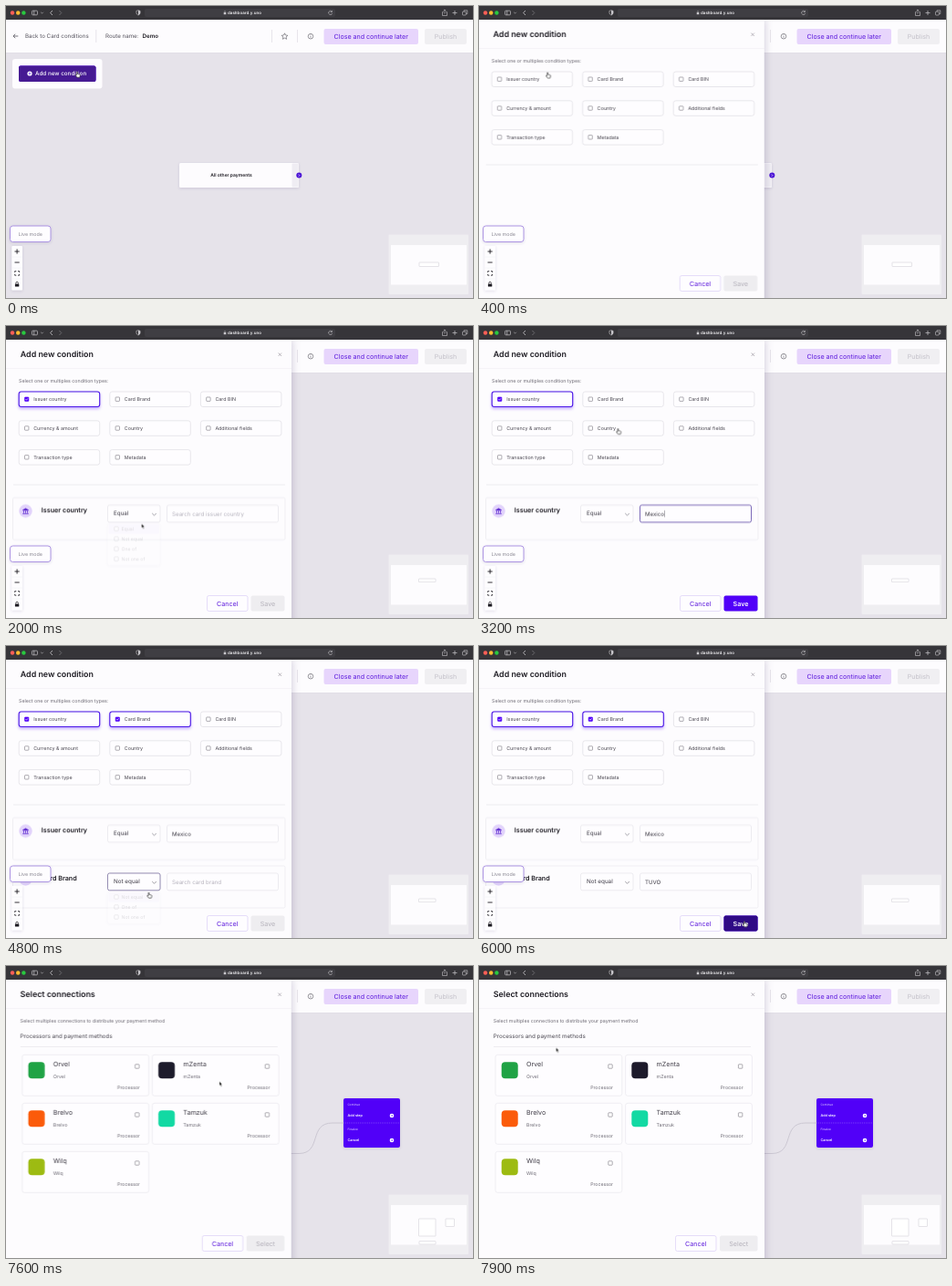
Write an HTML page that moves like this. It is 512x320 px and loops after 8000 ms.

```html
<!DOCTYPE html>
<html lang="en">
<head>
<meta charset="utf-8">
<title>Card conditions</title>
<style>
html, body { margin: 0; width: 100%; height: 100%; overflow: hidden; background: #e6e3ea; }
svg { display: block; width: 512px; height: 320px; overflow: hidden; }
text { font-family: Inter, sans-serif; text-rendering: geometricPrecision; white-space: pre; }
</style>
</head>
<body>
<svg id="stage" viewBox="0 0 512 320"></svg>
<script>
const LOOP = 8000, VIOLET = '#5100f8', INK = '#1d1b22', GREY = '#6c6973';
const css = [];
const pct = ms => (ms / LOOP * 100).toFixed(4) + '%';

function animate(stops, body) {
  const name = 'k' + css.length;
  css.push(`@keyframes ${name}{${stops.map(([t, rule]) => pct(t) + '{' + rule + '}').join('')}}`);
  return `<g style="animation:${name} ${LOOP}ms linear infinite">${body}</g>`;
}

// Shows the body during the given [from, to] spans
function vis(spans, body, fadeIn = 1, fadeOut = 1) {
  const stops = [];
  if (spans[0][0] > 0) stops.push([0, 0]);
  for (const [a, b] of spans) {
    if (a > 0) stops.push([a - fadeIn, 0]);
    stops.push([a, 1]);
    if (b < LOOP) stops.push([b - 1, 1], [b - 1 + fadeOut, 0]);
    else stops.push([LOOP, 1]);
  }
  if (spans[spans.length - 1][1] < LOOP) stops.push([LOOP, 0]);
  return animate(stops.map(([t, o]) => [t, 'opacity:' + o]), body);
}
const span = (a, b, body, fadeIn, fadeOut) => vis([[a, b]], body, fadeIn, fadeOut);

function move(points, body) {
  return animate(points.map(([t, x, y, ease = 'ease-in-out']) =>
    [t, `transform:translate(${x}px,${y}px);animation-timing-function:${ease}`]), body);
}

const text = (x, y, size, str, fill = GREY, weight = 400, anchor = 'start') =>
  `<text x="${x}" y="${y}" font-size="${size}" fill="${fill}" font-weight="${weight}" text-anchor="${anchor}">${str}</text>`;
const box = (x, y, w, h, fill, stroke = 'none', r = 2, sw = .7, extra = '') =>
  `<rect x="${x}" y="${y}" width="${w}" height="${h}" rx="${r}" fill="${fill}" stroke="${stroke}" stroke-width="${sw}" ${extra}/>`;
const dot = (x, y, r, fill, stroke = 'none', sw = .7) =>
  `<circle cx="${x}" cy="${y}" r="${r}" fill="${fill}" stroke="${stroke}" stroke-width="${sw}"/>`;
const line = (d, stroke, sw = .7, extra = '') =>
  `<path d="${d}" fill="none" stroke="${stroke}" stroke-width="${sw}" ${extra}/>`;
const at = (x, y, body, k = 1) => `<g transform="translate(${x} ${y}) scale(${k})">${body}</g>`;

const defs = `<defs>
  <filter id="soft" x="-20%" y="-30%" width="140%" height="170%"><feDropShadow dx="0" dy="1" stdDeviation="1.8" flood-color="#4b3a78" flood-opacity=".16"/></filter>
  <filter id="glow" x="-20%" y="-40%" width="140%" height="200%"><feDropShadow dx="0" dy="2" stdDeviation="1.6" flood-color="#6a30ff" flood-opacity=".38"/></filter>
</defs>`;

function browserBar() {
  const pale = '#c9c8cc', dim = '#77767a';
  return box(0, 0, 512, 15, '#363539', 'none', 0) +
    ['#fe5f57', '#febc2e', '#28c840'].map((c, i) => dot(7 + i * 6.2, 7.5, 2.2, c)).join('') +
    box(28.5, 5.2, 6, 4.6, 'none', pale, 1, .7) + line('M30.7 5.2v4.6', pale) +
    line('M38.2 6.8l1.3 1.3 1.3-1.3', pale, .6) +
    line('M51 5l-2.4 2.5L51 10', pale, .8) + line('M58.4 5l2.4 2.5L58.4 10', dim, .8) +
    line('M145 4.7l2.1.7v2q0 1.8-2.1 2.7-2.1-.9-2.1-2.7v-2z', pale, .6) +
    `<path d="M145 4.7v5.4q2.1-.9 2.1-2.7v-2z" fill="${pale}"/>` +
    box(152, 3, 209, 9, '#3f3e43', 'none', 2) +
    box(238.7, 7, 2.6, 2.2, pale, 'none', .3) + line('M239.3 7V6.2a.7.7 0 0 1 1.4 0V7', pale, .4) +
    text(243, 9.2, 4.5, 'dashboard.y.uno', '#f1f0f3', 600) +
    line('M357.2 6.2a2 2 0 1 0 .4 1.7M357.4 4.9v1.6h-1.6', pale, .6) +
    line('M479.6 6.6h-1.1v3.9h5V6.6h-1.1M481 8.6V4M479.7 5.2L481 3.9l1.3 1.3', pale, .6) +
    line('M492 5v5M489.5 7.5h5', pale, .7) +
    box(500.5, 6.2, 3.8, 3.8, 'none', pale, .6, .6) + line('M502 6.2V4.8h3.8v3.8h-1.5', pale, .6);
}

function header() {
  const dark = '#55525c';
  return box(0, 15, 512, 36.5, '#fdfcfe', 'none', 0) + line('M0 51.5H512', '#d9d6de', .6) +
    line('M13.3 33H8M10.2 30.8L8 33l2.2 2.2', dark, .8) +
    text(21, 35.3, 6.2, 'Back to Card conditions', dark) +
    line('M98.8 26v14M291.5 26v14M319.5 26v14', '#dedbe3') +
    text(109, 35.3, 6.2, 'Route name:', dark) + text(149.5, 35.3, 6.2, 'Demo', INK, 600) +
    line('M305.5 29.8l1 2.2 2.4.3-1.8 1.6.5 2.4-2.1-1.2-2.1 1.2.5-2.4-1.8-1.6 2.4-.3z', dark, .6) +
    dot(334, 33.2, 2.8, 'none', dark, .6) + line('M334 32.8v1.8M334 31.5v.6', dark, .6) +
    box(348.5, 25, 103.5, 17, '#e7d5fc') +
    text(400.2, 35.9, 7.1, 'Close and continue later', '#5a17dc', 400, 'middle') +
    box(459, 25, 46, 17, '#f0eff2') + text(482, 35.9, 7.1, 'Publish', '#c3c0c9', 400, 'middle');
}

const handle = (x, y) => dot(x, y, 3, '#4b12d6') + line(`M${x - .6} ${y - 1.2}l1.2 1.2-1.2 1.2`, '#fff', .7);

function restNode(x, y) {
  return box(x, y, 131, 27, '#fdfcfe', 'none', 1.5, 0, 'filter="url(#soft)"') +
    box(x + 123.5, y + .5, 7.2, 26, '#efedf3', 'none', 1) +
    text(x + 57, y + 15.3, 5, 'All other payments', INK, 600, 'middle') + handle(x + 131.3, y + 13.6);
}

const bank = `<path d="M0-3.2L3.3-1.2v.7h-6.6v-.7zM-2.6 0h1v2h-1zM-.5 0h1v2h-1zM1.6 0h1v2h-1zM-3.3 2.4h6.6v.9h-6.6z" fill="#5a25cf"/>`;
const card = box(-3, -2.2, 6, 4.4, 'none', '#5a25cf', .6, .7) + line('M-3-.7h6', '#5a25cf', .8);
const badge = (x, y, r, icon) => dot(x, y, r, '#e2d3fb') + at(x, y, icon, r / 7.2);

function conditionNode() {
  const part = (y, icon, name, op, w, value, vw) => badge(201, y, 4.2, icon) +
    text(197, y + 13, 3.9, name, INK, 600) +
    box(197, y + 19.3, w, 9, '#d5e8fb', '#86b4ec', 2, .7) + text(199.2, y + 25.3, 4.3, op, '#34506e') +
    box(197, y + 33, vw, 7, '#fff', '#eceaf0', 1, .5) + text(199, y + 37.6, 2.9, value, GREY);
  return box(188, 145, 114, 121, '#fdfcfe', 'none', 1.5, 0, 'filter="url(#soft)"') +
    box(295, 145.5, 6.8, 120, '#efedf3', 'none', 1) +
    line('M282 145V266M188 215.5H282', '#efedf2', .5) +
    part(158, bank, 'Issuer country', 'Equal', 15.5, 'MX', 10) +
    part(216.3, card, 'Card Brand', 'Not equal', 24.5, 'tuvo', 12) +
    line('M287 161v4.6M286 164.6l1 1 1-1M289.4 165.6V161M288.4 162l1-1 1 1', '#55525c', .6) +
    dot(288.2, 153, .5, '#c9c6cf') + handle(302, 205.3);
}

function stepMenu() {
  const row = (y, head, label) => text(374.5, y - 11, 3.2, head, '#e4d8ff') +
    text(374.5, y + 1.4, 3.8, label, '#fff', 600) + dot(423, y, 2.3, '#fff') +
    line(`M422 ${y}h2M423.2 ${y - .8}l.8.8-.8.8`, VIOLET, .5);
  return line('M305 205.5H321C347 205.5 331 172 358 172H370', '#c5c1cc', .8) +
    box(370, 145, 62, 54, VIOLET, 'none', 2, 0, 'filter="url(#soft)"') +
    row(164, 'Continue', 'Add step') + line('M370 172H432', '#a583fb', .5, 'stroke-dasharray="1 1"') +
    row(191, 'Finalize', 'Cancel');
}

function workspace() {
  const label = text(32, 76.3, 6.3, 'Add new condition', '#fff', 500) +
    dot(26, 74, 2.6, '#fff') + line('M26 72.7v2.6M24.7 74h2.6', VIOLET, .6);
  const mini = (x, y, w, h) => box(x, y, w, h, '#fff', '#d3d1d8', .5, .6);
  return box(0, 0, 512, 320, '#e6e3ea', 'none', 0) + header() +
    box(7, 58, 98.5, 32.5, '#fdfcfe', 'none', 3) + box(14, 65.5, 84.5, 17.5, VIOLET) +
    span(0, 400, box(14, 65.5, 84.5, 17.5, '#461a93')) + label +
    span(0, 1500, restNode(190, 172)) +
    span(6400, LOOP, conditionNode() + at(188, 298, restNode(0, 0), .87), 150) +
    span(6650, LOOP, stepMenu(), 100) +
    box(419.5, 250.5, 87.5, 65.5, '#efeef1', 'none', 1) + box(422, 262, 83, 43.5, '#fdfcfe', 'none', 0) +
    span(0, 1500, mini(453, 281, 21.5, 4.5)) + span(1500, 6400, mini(452.5, 277, 18.5, 3.6)) +
    span(6400, LOOP, mini(452.5, 277, 18.5, 19) + mini(453, 301.5, 18, 3.5)) +
    span(6650, LOOP, mini(482, 277, 9.5, 8.5));
}

const tick = (x, y, on) => box(x - 2.2, y - 2.2, 4.4, 4.4, on ? VIOLET : '#fff', on ? VIOLET : '#77747e', .6, .6) +
  (on ? line(`M${x - 1.2} ${y}l.9 1 1.6-1.8`, '#fff', .7) : '');

function option(x, y, name, since) {
  return box(x, y, 88.5, 16.5, '#fefdff', '#dfdde3', 2.5) + tick(x + 8.5, y + 8.2) +
    (since ? span(since, LOOP, box(x, y, 88.5, 16.5, '#fefdff', '#4b16e8', 2.5, 1.1, 'filter="url(#glow)"') +
      tick(x + 8.5, y + 8.2, true)) : '') +
    text(x + 16, y + 10.2, 5.35, name, '#4a4750');
}

// One condition row; "c" carries its labels and the moments it changes
function condition(c) {
  const frame = (x, w, stroke, sw) => box(x, 8, w, 18.8, '#fefdff', stroke, 2, sw);
  const list = (x, w, rows) => box(x, 28, w, rows.length * 11 + 2, '#fff', '#efedf3', 2, .6, 'filter="url(#soft)"') +
    box(x + 1, 29, w - 2, 10.5, '#f1ebfd', 'none', 1) +
    rows.map((r, i) => tick(x + 9.5, 34 + i * 11) + text(x + 15, 36 + i * 11, 5.2, r)).join('');
  const typed = c.typed.map(([a, b, s]) => span(a, b, text(182, 19.6, 6.1, s, '#3d3a44'))).join('');
  return box(7.5, 0, 298.5, 46, '#fdfcfe', '#eae8ee', 1.5, .7) +
    badge(21.5, 14.5, 7.2, c.icon) + text(38.8, 15.6, 7.2, c.name, INK, 600) +
    frame(111.5, 57.5, '#e6e4ea', .7) + span(...c.select, frame(111.5, 57.5, c.ring, .9)) +
    span(c.start, c.pick, text(118, 18.9, 6.3, 'Conditional', '#b5b2bc')) +
    span(c.pick, LOOP, text(118, 18.9, 6.3, c.op, '#3d3a44')) +
    line('M160.2 17l2.3 2.3 2.3-2.3', '#77747e', .7) +
    frame(176.5, 122, '#e6e4ea', .7) + span(...c.focus, frame(176.5, 122, '#6f5bb0', .9)) +
    span(c.start, c.typed[0][0], text(182, 19.6, 6.2, c.hint, '#b5b2bc')) + typed + c.caret +
    span(c.open, c.pick, list(111.5, 57.5, c.ops), 100, 130) +
    span(c.typed[0][0], c.done, list(176.5, 122, [c.answer]), 60, 100);
}

const drawer = (title, body) =>
  `<g style="filter:drop-shadow(1px 0 4px rgba(60,40,100,.22))">${box(-40, 15, 353, 320, '#fdfcfe', 'none', 0)}</g>` +
  text(15.8, 34.3, 8.9, title, INK, 600) + line('M298.6 29.6l3.4 3.4M302 29.6l-3.4 3.4', '#9c99a3', .7) +
  line('M0 46.5H313', '#f0eef3', .6) + body;
const button = (x, w, label, fill, color, stroke = 'none', weight = 400) =>
  box(x, 295.5, w, 17, fill, stroke) + text(x + w / 2, 306.5, 7.1, label, color, weight, 'middle');

function conditionDrawer() {
  const names = [['Issuer country', 620], ['Card Brand', 3500], ['Card BIN'], ['Currency &amp; amount'], ['Country'],
    ['Additional fields'], ['Transaction type'], ['Metadata']];
  const options = names.map(([n, t], i) => option(14.2 + i % 3 * 99.6, 72 + (i / 3 | 0) * 31.8, n, t)).join('');
  const issuer = condition({
    name: 'Issuer country', icon: bank, start: 0, select: [700, 1950], ring: '#7c62c4', open: 1300, pick: 1900,
    op: 'Equal', ops: ['Equal', 'Not equal', 'One of', 'Not one of'], hint: 'Search card issuer country',
    typed: [[2500, 2600, 'M'], [2600, 2700, 'Me'], [2700, 2900, 'Mex'], [2900, LOOP, 'Mexico']],
    focus: [2400, 3500], caret: span(2900, 3400, line('M203.7 13.8v7.4', '#3d3a44', .5)), answer: 'Mexico', done: 2900
  });
  const brand = condition({
    name: 'Card Brand', icon: card, start: 0, select: [4150, 5100], ring: '#8b82ab', open: 4300, pick: 4700,
    op: 'Not equal', ops: ['Not equal', 'One of', 'Not one of'], hint: 'Search card brand',
    typed: [[5250, 5350, 'T'], [5350, 5600, 'TU'], [5600, LOOP, 'TUVO']],
    focus: [5100, 5800], caret: '', answer: 'TUVO', done: 5600
  });
  return drawer('Add new condition',
    text(14, 62, 5.27, 'Select one or multiples condition types:') + options +
    line('M8 174H306', '#e4e2e8', .6) +
    button(220.5, 44.5, 'Cancel', '#fefdff', '#5a17dc', '#dccff7') +
    button(268.5, 37, 'Save', '#eeedf0', '#b4b1ba') +
    vis([[2900, 3500], [5600, 7000]], button(268.5, 37, 'Save', VIOLET, '#fff', 'none', 600)) +
    span(5900, 7000, button(268.5, 37, 'Save', '#2f0a85', '#fff', 'none', 600)) +
    span(3500, 7000, at(0, 241, brand), 80) + span(700, 7000, at(0, 188.3, issuer), 80));
}

function connectionDrawer() {
  const items = [['Orvel', '#20a345'], ['mZenta', '#1d1b2b'], ['Brelvo', '#fb5b0a'], ['Tamzuk', '#12d9a3'], ['Wilq', '#9dbb12']];
  const tiles = items.map(([n, c], i) => at(i % 2 * 142.6, (i >> 1) * 53,
    box(18, 97.3, 138.8, 45, '#fefdff', '#eae8ee', 2.5) + box(24.7, 105.2, 18, 18, c, 'none', 4) +
    text(52, 110, 7.1, n, '#3d3a44') + text(52, 123, 5.2, n) + tick(144, 110) +
    text(147, 134.5, 5.2, 'Processor', GREY, 400, 'end'))).join('');
  return drawer('Select connections',
    text(15.8, 62, 5.27, 'Select multiples connections to distribute your payment method') +
    text(15.8, 78.8, 6.25, 'Processors and payment methods', '#4a4750') +
    line('M16 88.5H298', '#e4e2e8', .6) + tiles +
    button(215.5, 44.5, 'Cancel', '#fefdff', '#5a17dc', '#dccff7') +
    button(264, 41.5, 'Select', '#eeedf0', '#b4b1ba'));
}

function tools() {
  return box(4.5, 241, 44.5, 17.5, '#fefdff', '#a48be0', 3, .9, 'filter="url(#soft)"') +
    text(26.8, 251.7, 5.35, 'Live mode', '#8a8792', 400, 'middle') +
    box(6.3, 263, 11.7, 48.5, '#fefdff', 'none', 1, 0, 'filter="url(#soft)"') +
    line('M6.3 275H18M6.3 287H18M6.3 299H18', '#eeecf1', .5) +
    line('M12.1 266.4v5.2M9.5 269h5.2M9.5 281h5.2', INK, .9) +
    line('M9.7 292v-1.4h1.6M13 290.6h1.6v1.4M14.6 293.8v1.4H13M11.3 295.2H9.7v-1.4', INK, .8) +
    box(9.9, 304.4, 4.4, 3.2, INK, 'none', .5) + line('M10.8 304.5v-.9a1.3 1.3 0 0 1 2.6 0v.9', INK, .7);
}

function pointer() {
  const hands = [[0, 450], [580, 760], [1100, 2000], [2650, 3600], [3900, 5000], [5450, 7350]];
  const arrows = hands.map(([, b], i) => [b, i + 1 < hands.length ? hands[i + 1][0] : LOOP]);
  const arrow = `<path d="M0 0v4.6l1.1-1 .8 1.8.8-.4-.8-1.7h1.4z" fill="#111" stroke="#fff" stroke-width=".4"/>`;
  const hand = `<path d="M-.6.5q.6-.8 1.1 0v2l2.3.5q.6.2.5.9l-.5 2.3H-.1L-1.8 4q0-.8.7-.5l.5.4z" fill="#fff" stroke="#222" stroke-width=".6"/>`;
  return move([
    [0, 78, 72], [350, 78, 72], [600, 45, 80], [720, 45, 80, 'ease-in'], [900, 104, 136, 'ease-out'],
    [1150, 140, 206], [1300, 140, 206], [1700, 128, 220], [1900, 128, 220], [2200, 215, 206],
    [2500, 215, 206], [2750, 200, 223], [2900, 200, 223, 'ease-in'], [3200, 152.5, 112.5, 'ease-out'],
    [3450, 140, 80], [3550, 140, 80], [4000, 140, 257], [4300, 140, 257], [4550, 156.5, 270],
    [4800, 156.5, 270], [5150, 215, 258], [5400, 215, 258], [5550, 195, 275], [5650, 195, 275],
    [5900, 291, 301.5], [6100, 291, 301.5], [6450, 303, 205.5], [6800, 303, 205.5], [7050, 385, 164],
    [7300, 385, 164], [7900, 84.5, 89.5], [8000, 84, 89.5]
  ], vis(hands, hand) + vis(arrows, arrow));
}

const away = -330, slide = 'cubic-bezier(.2,.7,.3,1)';
document.getElementById('stage').innerHTML = defs + workspace() +
  move([[0, away, 0], [100, away, 0, slide], [420, 0, 0], [6100, 0, 0, slide], [6420, away, 0], [LOOP, away, 0]], conditionDrawer()) +
  move([[0, away, 0], [7300, away, 0, slide], [7620, 0, 0], [LOOP, 0, 0]], connectionDrawer()) +
  tools_layer() + browserBar() + pointer();

// The floating tools stay above the condition drawer only
function tools_layer() {
  return vis([[0, 7400]], tools(), 1, 150);
}
document.head.appendChild(document.createElement('style')).textContent = css.join('\n');
</script>
</body>
</html>
```
